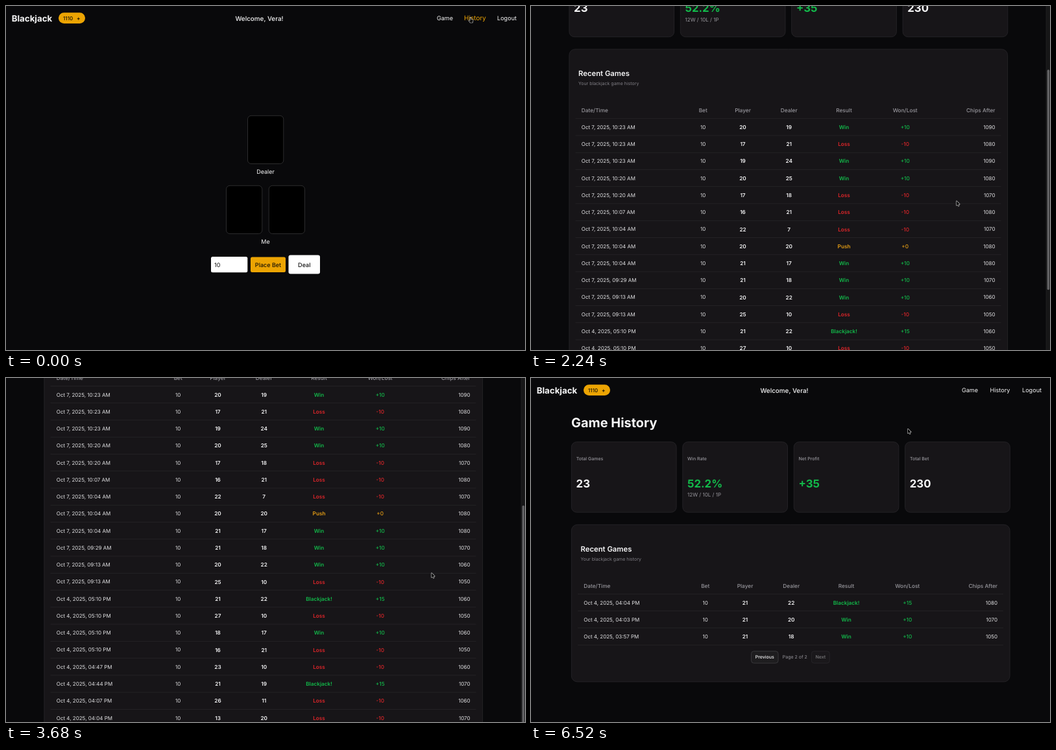
Write an HTML page with a canvas that moves like this. It is 800 by 531 pixels and loops after 6.56 s.

```html
<!DOCTYPE html>
<html lang="en">
<head>
<meta charset="utf-8">
<title>Blackjack</title>
<style>
  html, body { margin: 0; width: 100%; height: 100%; overflow: hidden; background: #09090b; }
  canvas { display: block; width: 800px; height: 531px; }
</style>
</head>
<body>
<canvas id="stage"></canvas>
<script>
const W = 800, H = 531, LOOP = 6560;
const canvas = document.getElementById('stage');
const ctx = canvas.getContext('2d');
const dpr = window.devicePixelRatio || 1;
canvas.width = Math.round(W * dpr);
canvas.height = Math.round(H * dpr);

const C = {
  bg: '#09090b', card: '#171518', edge: '#29282b', line: '#29272a', hover: '#1d1c1e',
  text: '#f7f7f8', body: '#e4e4e6', muted: '#98979d', dim: '#807f85',
  amber: '#eca403', green: '#12b94a', red: '#dc2529', push: '#e39c14'
};
const RESULTS = {
  W: ['Win', '+10', C.green], L: ['Loss', '-10', C.red],
  P: ['Push', '+0', C.push], B: ['Blackjack!', '+15', C.green]
};

// date, player, dealer, result, chips
const parse = s => s.trim().split('\n').map(r => r.split('|'));
const PAGE1 = parse(`
7, 2025, 10:23 AM|20|19|W|1090
7, 2025, 10:23 AM|17|21|L|1080
7, 2025, 10:23 AM|19|24|W|1090
7, 2025, 10:20 AM|20|25|W|1080
7, 2025, 10:20 AM|17|18|L|1070
7, 2025, 10:07 AM|16|21|L|1080
7, 2025, 10:04 AM|22|7|L|1070
7, 2025, 10:04 AM|20|20|P|1080
7, 2025, 10:04 AM|21|17|W|1080
7, 2025, 09:29 AM|21|18|W|1070
7, 2025, 09:13 AM|20|22|W|1060
7, 2025, 09:13 AM|25|10|L|1050
4, 2025, 05:10 PM|21|22|B|1060
4, 2025, 05:10 PM|27|10|L|1050
4, 2025, 05:10 PM|18|17|W|1060
4, 2025, 05:10 PM|16|21|L|1050
4, 2025, 04:47 PM|23|10|L|1060
4, 2025, 04:44 PM|21|19|B|1070
4, 2025, 04:07 PM|26|11|L|1060
4, 2025, 04:04 PM|13|20|L|1070`);
const PAGE2 = parse(`
4, 2025, 04:04 PM|21|22|B|1080
4, 2025, 04:03 PM|21|20|W|1070
4, 2025, 03:57 PM|21|18|W|1050`);

const COLS = [['Bet', 265.2], ['Player', 326.5], ['Dealer', 397.7], ['Result', 482.5], ['Won/Lost', 576.7]];
const ROW0 = 346.6, PITCH = 26.26;

// Moments of the story, in ms
const T = { leave: 360, loaded: 760, unhover: 860, next: 4840, page2: 5560 };

const SCROLL = [[1440, 0], [1560, 14], [2240, 159.5], [2800, 227], [3680, 320.8], [4040, 365], [4100, 368.6]];
const MOUSE = [
  [0, 716, 17.5], [800, 716, 18], [900, 712, 38], [1160, 665, 270], [1320, 655, 303],
  [2000, 655, 303], [2200, 656, 301], [4200, 656, 301], [4300, 638, 318], [4600, 510, 424],
  [4680, 480.5, 458], [4780, 449, 507], [5320, 449, 503], [5520, 449, 503],
  [5840, 400, 420], [6180, 256, 394], [6340, 640, 230], [6480, 581, 78.5]
];

// Linear value of a keyed track, one entry per channel
function track(keys, t) {
  if (t <= keys[0][0]) return keys[0].slice(1);
  for (let i = 1; i < keys.length; i++) {
    const a = keys[i - 1], b = keys[i];
    if (t < b[0]) {
      const k = (t - a[0]) / (b[0] - a[0]);
      return a.slice(1).map((v, j) => v + (b[j + 1] - v) * k);
    }
  }
  return keys[keys.length - 1].slice(1);
}

function text(s, x, y, size, weight, color, align = 'left') {
  ctx.font = `${weight} ${size}px Inter, "Liberation Sans", sans-serif`;
  ctx.textAlign = align;
  ctx.fillStyle = color;
  ctx.fillText(s, x, y + size * 0.364);
}

function box(x, y, w, h, r, fill, stroke) {
  ctx.beginPath();
  ctx.roundRect(x, y, w, h, r);
  ctx.fillStyle = fill;
  ctx.fill();
  if (stroke) {
    ctx.strokeStyle = stroke;
    ctx.lineWidth = 0.8;
    ctx.stroke();
  }
}

function rule(y) {
  ctx.fillStyle = C.line;
  ctx.fillRect(68.5, y - 0.35, 656, 0.7);
}

// shift: 0 with a scrollbar, 3.5 without
function header(shift, hot) {
  text('Blackjack', 8.7, 19, 13.3, 700, C.text);
  box(81, 10.3, 41, 16.7, 8.3, C.amber);
  text('1110', 88, 18.8, 8, 500, '#1a1306');
  text('+', 111.8, 18.6, 8, 700, '#1a1306', 'center');
  text('Welcome, Vera!', 387 + shift, 19.3, 9.9, 500, C.text, 'center');
  const nx = shift * 2;
  text('Game', 669.5 + nx, 18.8, 9.1, 400, C.text, 'center');
  text('History', 716 + nx, 18.8, hot ? 10 : 9.1, 400, hot ? C.amber : C.text, 'center');
  text('Logout', 765 + nx, 18.8, 9.1, 400, C.text, 'center');
}

function table() {
  for (const [x, y] of [[372.5, 169.3], [339.5, 277.3], [405.2, 277.3]])
    box(x, y, 55.3, 74.2, 5.5, '#000', '#363638');
  text('Dealer', 400, 255.8, 9, 400, C.text, 'center');
  text('Me', 400, 363.8, 9, 400, C.text, 'center');
  box(316, 387, 56.3, 24.3, 2.5, '#fff');
  text('10', 321, 399.3, 9, 400, '#111');
  box(377, 387.5, 54, 23.5, 2.5, C.amber);
  text('Place Bet', 404, 399.3, 9, 500, '#1a1306', 'center');
  box(435.5, 384.5, 48.5, 29, 3, '#fff');
  text('Deal', 459.8, 399.3, 9.1, 500, '#111', 'center');
}

function stat(i, label, value, color, note) {
  const x = 58.9 + i * 171.4;
  box(x, 98.7, 161.7, 108.6, 8, C.card, C.edge);
  text(label, x + 7.3, 124.8, 7, 500, C.muted);
  text(value, x + 7.2, 162.5, 16.8, 700, color);
  if (note) text(note, x + 7.3, 180.4, 8, 400, C.muted);
}

function button(label, x, y, w, on) {
  ctx.globalAlpha = on ? 1 : 0.45;
  box(x, y - 9.2, w, 18.4, 4, '#1e1d1f', '#403f43');
  text(label, x + w / 2, y, 7, 500, C.text, 'center');
  ctx.globalAlpha = 1;
}

function row(cells, i, hot) {
  const [date, player, dealer, code, chips] = cells;
  const [name, won, color] = RESULTS[code];
  const y = ROW0 + i * PITCH;
  if (hot) {
    ctx.fillStyle = C.hover;
    ctx.fillRect(68.5, y - 13, 656, PITCH);
  }
  text('Oct ' + date, 77.8, y, 8, 400, C.body);
  text('10', 265.2, y, 8, 400, C.body, 'center');
  text(player, 326.5, y, 8.2, 600, C.text, 'center');
  text(dealer, 397.7, y, 8.2, 600, C.text, 'center');
  text(name, 482.5, y, 8.2, 600, color, 'center');
  text(won, 576.7, y, 8.2, 500, color, 'center');
  text(chips, 715.5, y, 8, 400, C.body, 'right');
  rule(y + 13);
}

function history(rows, page, hotRow) {
  stat(0, 'Total Games', '23', C.text);
  stat(1, 'Win Rate', '52.2%', C.green, '12W / 10L / 1P');
  stat(2, 'Net Profit', '+35', C.green);
  stat(3, 'Total Bet', '230', C.text);

  const foot = ROW0 + (rows.length - 1) * PITCH + 31.8;
  box(58.9, 226.4, 675.7, foot + 38 - 226.4, 9, C.card, C.edge);
  text('Recent Games', 73, 263.6, 11.3, 600, C.text);
  text('Your blackjack game history', 73, 279.2, 7, 400, C.dim);

  text('Date/Time', 77.8, 320.6, 8.3, 500, C.muted);
  for (const [label, x] of COLS) text(label, x, 320.6, 8.3, 500, C.muted, 'center');
  text('Chips After', 715.5, 320.6, 8.3, 500, C.muted, 'right');
  rule(333.4);
  rows.forEach((r, i) => row(r, i, i === hotRow));

  button('Previous', 336, foot, 41.6, page === 2);
  text(`Page ${page} of 2`, 403.3, foot, 7, 400, C.muted, 'center');
  button('Next', 428.8, foot, 28, page === 1);
}

function scrollbar(scroll) {
  ctx.fillStyle = '#161617';
  ctx.fillRect(794, 0, 6, H);
  ctx.fillStyle = '#252527';
  ctx.fillRect(793.7, 0, 0.7, H);
  box(795.6, 1 + scroll * 0.61, 3.6, 340, 1.8, '#626264');
}

function shape(points, fill, stroke) {
  ctx.beginPath();
  points.forEach(([x, y]) => ctx.lineTo(x, y));
  ctx.closePath();
  ctx.lineJoin = 'round';
  ctx.lineWidth = 1.1;
  ctx.strokeStyle = stroke;
  ctx.stroke();
  ctx.fillStyle = fill;
  ctx.fill();
}

function cursor(x, y, hand) {
  ctx.save();
  ctx.translate(x, y);
  if (hand)
    shape([[-0.6, 0], [0.5, 0], [0.6, 3], [3.6, 3.8], [3.8, 5.6], [2.9, 8.2],
           [-0.5, 8.2], [-2.6, 5.2], [-1.9, 4.6], [-0.7, 5.4]], '#111', '#e4e4e4');
  else
    shape([[0, 0], [0, 6.9], [1.6, 5.5], [2.7, 8], [3.8, 7.5], [2.7, 5.1], [4.9, 5]], '#000', '#dcdcdc');
  ctx.restore();
}

function draw(t) {
  ctx.setTransform(dpr, 0, 0, dpr, 0, 0);
  ctx.textRendering = 'geometricPrecision';
  ctx.fillStyle = C.bg;
  ctx.fillRect(0, 0, W, H);

  const first = t >= T.loaded && t < T.next;
  const second = t >= T.page2;
  const scroll = first ? track(SCROLL, t)[0] : 0;
  const shift = first ? 0 : 3.5;
  const [mx, my] = track(MOUSE, t);

  ctx.save();
  ctx.translate(0, -scroll);
  header(shift, t < T.unhover);
  if (t < T.leave) {
    table();
  } else {
    ctx.translate(shift, 0);
    text('Game History', 58.6, 69, 19.9, 700, C.text);
    // Row highlight trails the pointer a little
    const trail = track(MOUSE, t - 60)[1] + scroll;
    const hot = t > 4200 ? Math.floor((trail - ROW0 + 13) / PITCH) : -1;
    if (first) history(PAGE1, 1, hot);
    if (second) history(PAGE2, 2, hot);
  }
  ctx.restore();

  if (first) scrollbar(scroll);
  cursor(mx, my, t < T.unhover || (t >= 4760 && t < T.next));
}

const start = performance.now();
function tick(now) {
  draw(Math.max(0, now - start) % LOOP);
  requestAnimationFrame(tick);
}
draw(0);
requestAnimationFrame(tick);
</script>
</body>
</html>
```
